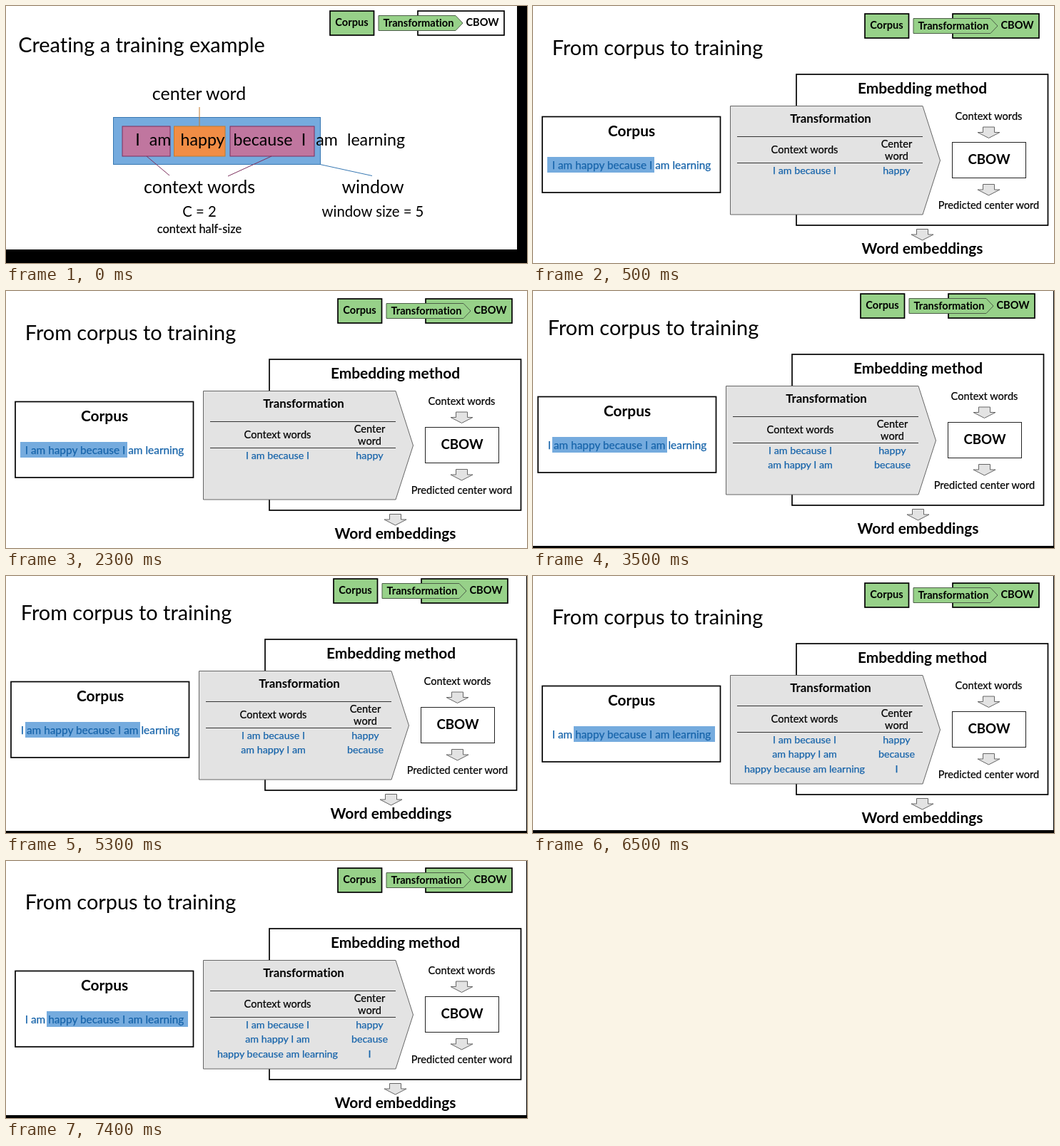
An HTML page that plays this animation: 730 px wide and 361 px high, repeating every 8000 ms.

```html
<!DOCTYPE html>
<html lang="en">
<head>
<meta charset="utf-8">
<title>From corpus to training</title>
<style>
  html, body { margin: 0; width: 100%; height: 100%; overflow: hidden; background: #000; }
  svg { display: block; width: 730px; height: 361px; font-family: Lato, sans-serif; }
  text { text-anchor: middle; white-space: pre; font-variant-ligatures: none; }
  .bold { font-weight: 700; }
  .thick { stroke: #000; stroke-width: 1.7; }
  .green { fill: #97d189; }
  .box { fill: #fff; }
  .grey { fill: #e3e3e3; stroke: #666; }
  .purple { fill: #c0769f; stroke: #7d2f5d; }
  .orange { fill: #f18d45; stroke: #c47a2c; }
  .blue { fill: #75abde; stroke: #3778b3; }
  .firm { stroke: #000; stroke-width: .2; }
  .ink { fill: #1764aa; stroke: #1764aa; stroke-width: .25; }
</style>
</head>
<body>
<svg viewBox="0 0 730 361">
  <defs><path id="down" class="grey" d="M-8 0H8V7.5H15.5L0 15.5L-15.5 7.5H-8Z"/></defs>
  <rect id="paper" fill="#fff"/>

  <g id="header" class="bold" font-size="14.6">
    <rect class="green thick" x="465" y="11" width="61.5" height="34"/>
    <rect id="model" class="thick" x="588" y="11" width="121" height="34"/>
    <path class="green" stroke="#4d5f49" d="M533 17.5H641L651 28L641 38.5H533Z"/>
    <text x="495.5" y="32.3">Corpus</text>
    <text x="589" y="33">Transformation</text>
    <text x="678.5" y="32.3">CBOW</text>
  </g>

  <g id="example" font-size="25">
    <text x="190" y="64.5" font-size="28.9">Creating a training example</text>
    <text x="270.5" y="132">center word</text>
    <rect class="blue" x="150.5" y="156.5" width="290" height="66"/>
    <rect class="purple" x="163" y="169" width="67" height="42"/>
    <rect class="orange" x="235.5" y="169" width="71.5" height="42"/>
    <rect class="purple" x="314" y="169" width="118" height="42"/>
    <path class="orange" d="M271 142V169"/>
    <path class="purple" d="M197 211L229 238M372 211L311 239"/>
    <path class="blue" d="M440 222.5L513 238.5"/>
    <g id="words" font-size="23.2"></g>
    <text x="271" y="263">context words</text>
    <text x="514" y="263">window</text>
    <g font-size="20.3">
      <text x="271" y="296">C = 2</text>
      <text x="514" y="296">window size = 5</text>
    </g>
    <text class="firm" x="271" y="319" font-size="16.4">context half-size</text>
  </g>

  <g id="training" font-size="14.6">
    <text x="174.5" y="68.5" font-size="28.9">From corpus to training</text>
    <rect class="box thick" x="369" y="96" width="352.5" height="212"/>
    <rect class="box thick" x="13" y="155.5" width="249.5" height="106.5"/>
    <path class="grey" d="M276.5 140.5H546L570.5 217L546 293H276.5Z"/>
    <path stroke="#333" d="M286 183.5H546M286 220.5H546"/>
    <rect class="box" stroke="#222" x="587.5" y="191.5" width="103" height="50"/>
    <use href="#down" x="638.5" y="170"/>
    <use href="#down" x="638.5" y="250.5"/>
    <use href="#down" x="545.5" y="313.5"/>
    <g class="bold" font-size="20.9">
      <text x="138" y="183.3">Corpus</text>
      <text x="545.5" y="122.8">Embedding method</text>
      <text x="545.5" y="347.5">Word embeddings</text>
      <text x="639" y="222" font-size="18.7">CBOW</text>
      <text x="417" y="164" font-size="16.8">Transformation</text>
    </g>
    <g class="firm">
      <text x="380.5" y="207">Context words</text>
      <text x="509.5" y="199">Center</text>
      <text x="509.5" y="216">word</text>
      <text x="638.5" y="160">Context words</text>
      <text x="638.5" y="285">Predicted center word</text>
    </g>
    <rect id="mark" fill="#75abde" y="212" height="22"/>
    <text class="ink" x="138" y="229" font-size="15.4">I am happy because I am learning</text>
    <g id="rows" class="ink" font-size="14.3"></g>
  </g>
</svg>
<script>
const el = id => document.getElementById(id);
const set = (id, attrs) => {
  for (const key in attrs) el(id).setAttribute(key, attrs[key]);
};
const addText = (id, x, y, text) => {
  const node = document.createElementNS("http://www.w3.org/2000/svg", "text");
  node.setAttribute("x", x);
  node.setAttribute("y", y);
  node.textContent = text;
  el(id).append(node);
};

const sentence = "I am happy because I am learning".split(" ");
const centers = [184.5, 216, 275.5, 360, 417, 449.5, 518.5];
sentence.forEach((word, i) => addText("words", centers[i], 196, word));

const pairs = [
  ["I am because I", "happy"],
  ["am happy I am", "because"],
  ["happy because am learning", "I"],
];
pairs.forEach(([context, center], i) => {
  addText("rows", 380.5, 236 + 20.3 * i, context);
  addText("rows", 509.5, 236 + 20.3 * i, center);
});

// shift: slide offset; paper: visible slide size; mark: highlighted span
const scenes = [
  { start: 0, shift: [-11, -4], paper: [716, 342], rows: 0, mark: [0, 0] },
  { start: 500, shift: [0, 0], paper: [730, 361], rows: 1, mark: [20, 170] },
  { start: 3500, shift: [-6, -7], paper: [729, 358], rows: 2, mark: [33, 194] },
  { start: 6500, shift: [0, -1], paper: [729, 357], rows: 3, mark: [57, 255] },
];
const LOOP = 8000;
let shown;

function show({ shift, paper, rows, mark }) {
  const transform = `translate(${shift})`;
  set("paper", { width: paper[0], height: paper[1] });
  set("header", { transform });
  set("training", { transform, display: rows ? "inline" : "none" });
  set("example", { display: rows ? "none" : "inline" });
  set("model", { fill: rows ? "#97d189" : "#fff" });
  set("mark", { x: mark[0], width: mark[1] - mark[0] });
  [...el("rows").children].forEach((node, i) =>
    node.setAttribute("display", i < rows * 2 ? "inline" : "none"));
}

function tick() {
  const time = performance.now() % LOOP;
  const scene = scenes.findLast(s => s.start <= time);
  if (scene !== shown) show(shown = scene);
  requestAnimationFrame(tick);
}
tick();
</script>
</body>
</html>
```
